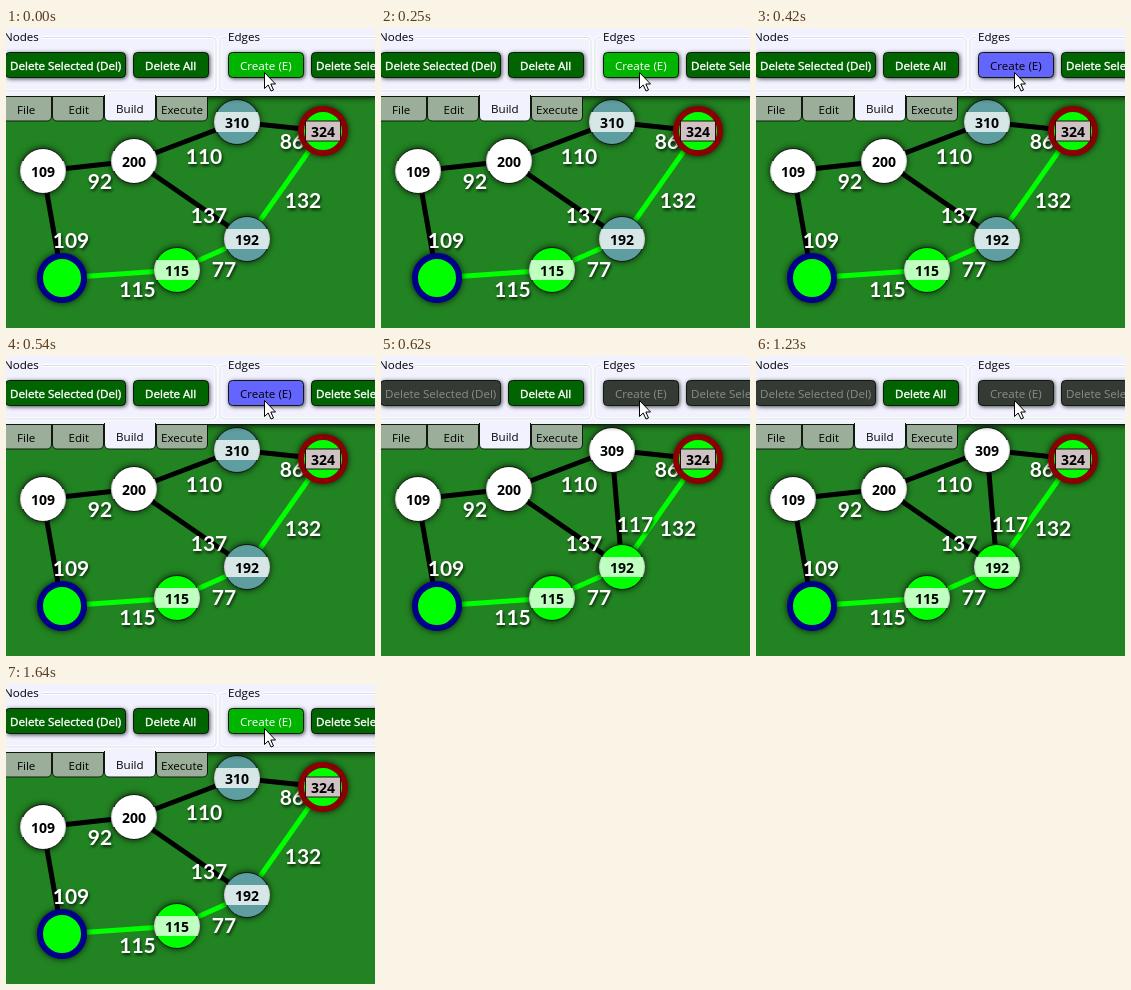
These frames come from a looping animation (369x300 px, 1.84 s). An HTML page:

```html
<!DOCTYPE html>
<html>
<head>
<meta charset="utf-8">
<style>
html, body { margin: 0; width: 100%; height: 100%; overflow: hidden; background: #228322; }
svg { display: block; font: 11.6px "Open Sans", "Noto Sans", sans-serif; }
.weight { font: 700 21px Lato, sans-serif; text-anchor: middle; filter: drop-shadow(1px 2px 1.5px rgba(0,0,0,.75)); }
.value { font-size: 14px; font-weight: 700; text-anchor: middle; }
.strong { stroke: #fff; stroke-width: .4px; }
.node { filter: drop-shadow(0 0 3px rgba(0,0,0,.8)); }
.button { filter: drop-shadow(1px 1px 2px rgba(0,0,0,.7)); }
.bar { filter: drop-shadow(0 1px 3px #000); }
</style>
</head>
<body>
<svg id="stage" width="369" height="300" viewBox="0 0 369 300"></svg>
<script>
const LOOP = 1840, PRESS = 420, CREATED = 620, RESET = 1640;
const stage = document.getElementById('stage');
const points = { a: [37, 143], b: [128, 133], c: [231, 94], d: [317, 103], e: [241, 211], f: [171, 242], s: [56, 250] };

const text = (x, y, label, fill = '#000', cls = '') =>
  `<text x="${x}" y="${y}" fill="${fill}" class="${cls}">${label}</text>`;

const edge = (from, to, color = '#000') =>
  `<path d="M${points[from]}L${points[to]}" stroke="${color}" stroke-width="5"/>`;

const weight = (x, y, label) => text(x, y, label, '#fff', 'weight');

function node(id, label, fill, ring) {
  const [x, y] = points[id], r = 23, w = 20.7;
  const circle = ring
    ? `<circle r="22" fill="${fill}" stroke="${ring}" stroke-width="6"/>`
    : `<circle r="22.5" fill="${fill}" stroke="#101810"/>`;
  const band = !label ? '' : ring
    ? '<rect x="-17.5" y="-10" width="35" height="20" fill="#d0c2c4" stroke="#201010"/>'
    : `<path d="M${-w}-10H${w}A${r} ${r} 0 0 1 ${w} 10H${-w}A${r} ${r} 0 0 1 ${-w}-10Z" fill="#fff" fill-opacity=".75"/>`;
  return `<g transform="translate(${x} ${y})"><g class="node">${circle}</g>${band}${text(0, 5.5, label, '#000', 'value')}</g>`;
}

function button(x, width, textX, label, fill, ink = '#fff', cls = '') {
  return `<rect class="button" x="${x + .5}" y="24.5" width="${width}" height="25" rx="4" fill="${fill}" stroke="#101810"/>` +
    text(textX, 41.5, label, ink, cls);
}

function tab(x, width, textX, label, active) {
  const top = active ? 67 : 69;
  return `<path d="M${x + .5} ${top}V88q0 5 5 5h${width - 10}q5 0 5-5V${top}" fill="${active ? '#f2f2ff' : '#9aae9a'}" stroke="#101810"/>` +
    text(textX, active ? 85 : 86, label);
}

function graph(created) {
  return '<g fill="none">' +
    edge('a', 'b') + edge('b', 'c') + edge('c', 'd') + edge('b', 'e') + edge('a', 's') +
    (created ? edge('c', 'e') : '') +
    edge('s', 'f', '#0f0') + edge('f', 'e', '#0f0') + edge('e', 'd', '#0f0') + '</g>' +
    weight(65, 219.5, 109) + weight(94, 161, 92) + weight(198, 136, 110) + weight(286, 121, 86) +
    weight(203, 195, 137) + weight(218, 249, 77) + weight(131.5, 269, 115) + weight(297, 180, 132) +
    (created ? weight(254, 176, 117) : '') +
    node('a', '109', '#fff') + node('b', '200', '#fff') +
    node('c', created ? '309' : '310', created ? '#fff' : '#5f9ea0') +
    node('d', '324', '#0f0', '#8b0000') +
    node('e', '192', created ? '#0f0' : '#5f9ea0') +
    node('f', '115', '#0f0') + node('s', '', '#0f0', '#00008b');
}

function toolbar(pressed, created) {
  const off = '#343b34', dim = '#8c8c8c';
  const fill = created ? off : '#006400', ink = created ? dim : '#fff', cls = created ? '' : 'strong';
  const createFill = created ? off : pressed ? '#6464ff' : '#00b400';
  const frames = 'M36 9.5H206q4 0 4 4V59q0 4-4 4H0M220 9.5H218q-4 0-4 4V59q0 4 4 4H369M259 9.5H369';
  return '<rect class="bar" x="-9" y="-9" width="387" height="77" fill="#f2f2ff"/>' +
    '<path d="M0 68.5H369" stroke="#101810"/>' +
    `<g fill="none"><path d="${frames}" stroke="#fff" stroke-width="3"/><path d="${frames}" stroke="#d5dfe5"/></g>` +
    text(-2, 13, 'Nodes') + text(222, 13, 'Edges') +
    button(-1, 120, 4, 'Delete Selected (Del)', fill, ink, cls) +
    button(127, 75, 139, 'Delete All', '#006400', '#fff', 'strong') +
    button(222, 75, 234, 'Create (E)', createFill, created ? dim : pressed ? '#000' : '#fff') +
    button(305, 120, 310, 'Delete Selected', fill, ink, cls) +
    tab(-6, 51, 11, 'File') + tab(46, 51, 62.5, 'Edit') + tab(150, 51, 155, 'Execute') + tab(98, 51, 110, 'Build', true);
}

const pointer = '<path d="M258.5 44.5V60.5L262.2 57L265 63L267.5 62L264.8 56H269.5Z" fill="#fff" stroke="#000"/>';

let shown;
function draw(now) {
  const t = now % LOOP;
  const pressed = t >= PRESS && t < CREATED;
  const created = t >= CREATED && t < RESET;
  const state = pressed ? 'pressed' : created ? 'created' : 'ready';
  if (state !== shown) {
    stage.innerHTML = graph(created) + toolbar(pressed, created) + pointer;
    shown = state;
  }
}

const start = performance.now();
function tick() {
  draw(performance.now() - start);
  requestAnimationFrame(tick);
}
tick();
</script>
</body>
</html>
```
